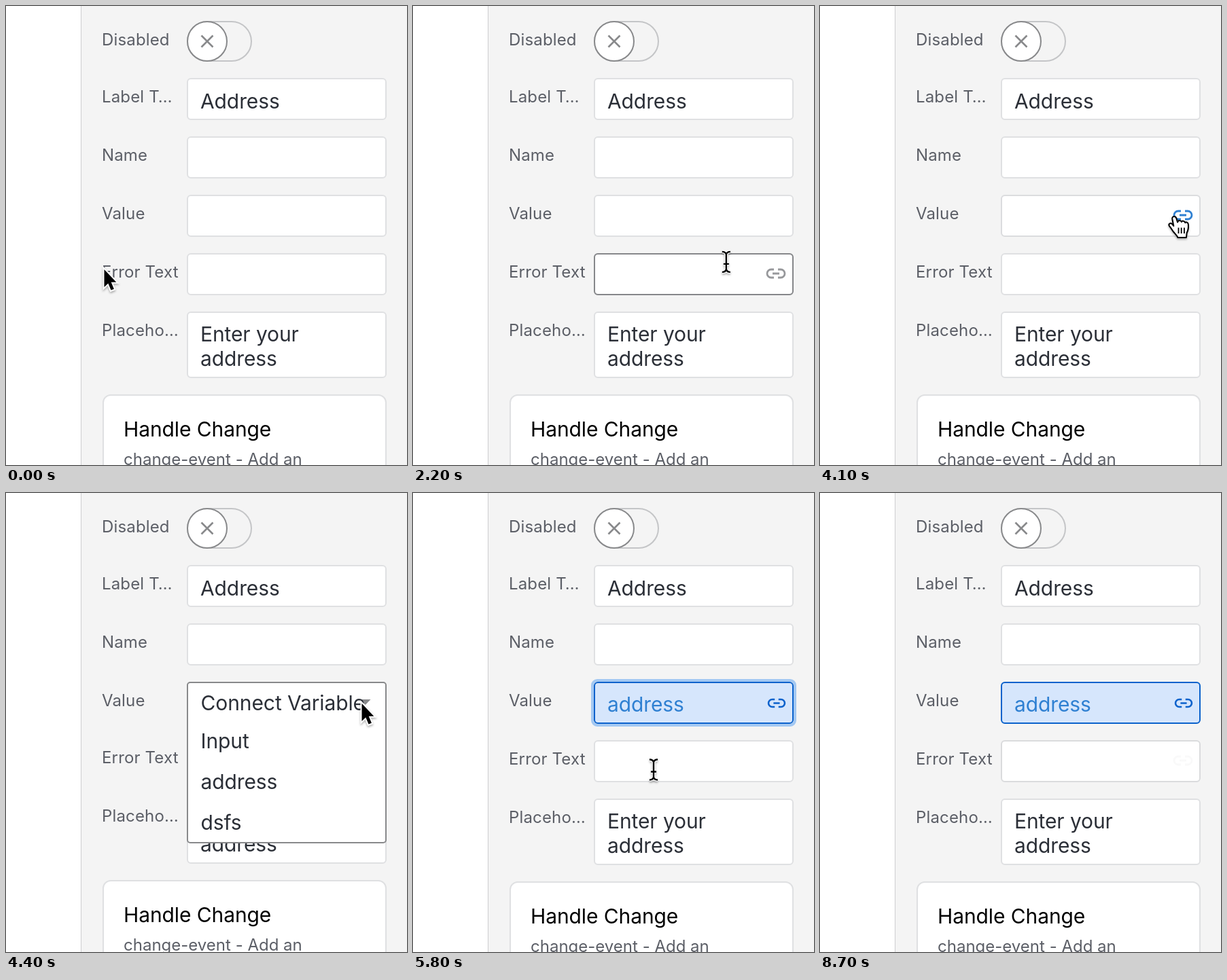
An HTML page that plays this animation: 590 by 676 pixels, repeating every 9.2 s.

```html
<!DOCTYPE html>
<html lang="en">
<head>
<meta charset="utf-8">
<title>Connect a variable</title>
<style>
  html, body { margin: 0; width: 100%; height: 100%; overflow: hidden; background: #fff; }
  svg { display: block; width: 590px; height: 676px; }
  text { font-family: Inter, "Open Sans", sans-serif; font-size: 30px; fill: #2b2f37; letter-spacing: -.1px; }
  .label, .sub { font-size: 24px; fill: #5b5e66; letter-spacing: .15px; }
  .sub { letter-spacing: 0; }
  .title { fill: #000; }
  .box { fill: #fff; stroke: #dfe0e2; stroke-width: 2; }
  .hover { fill: none; stroke: #86878a; stroke-width: 2; }
  .bound { fill: #d6e6fc; stroke: #0b62cc; stroke-width: 2; }
  .link { fill: none; stroke-width: 2.8; }
  .cursor { filter: drop-shadow(0 2px 1.5px rgba(0, 0, 0, .3)); }
</style>
</head>
<body>
<svg viewBox="0 0 590 676">
  <defs>
    <rect id="field" x="267" y="107" width="292" height="60" rx="5"/>
    <path id="link" d="M-3-6H-7A6 6 0 0 0-7 6H-3M3-6H7A6 6 0 0 1 7 6H3M-5 0H5"/>
    <path id="ibeam" d="M-6-15Q-1-15 0-11Q1-15 6-15M-6 15Q-1 15 0 11Q1 15 6 15M0-11V11M-4 3H4"/>
  </defs>

  <rect x="110" width="480" height="676" fill="#f4f4f4"/>
  <rect x="110" width="1" height="676" fill="#cdcdcf"/>

  <text class="label" x="141" y="58">Disabled</text>
  <rect x="267" y="23" width="94" height="58" rx="29" fill="#f4f4f4" stroke="#c4c5c7" stroke-width="2"/>
  <circle cx="296" cy="52" r="29" fill="#fff" stroke="#88898b" stroke-width="2"/>
  <path d="M287.5 43.5l17 17m0-17l-17 17" stroke="#88898b" stroke-width="2.6"/>

  <text class="label" x="141" y="142">Label T…</text>
  <use class="box" href="#field"/>
  <text x="286" y="150.5">Address</text>

  <text class="label" x="141" y="228">Name</text>
  <use class="box" href="#field" y="86"/>

  <text class="label" x="141" y="314">Value</text>
  <use class="box" href="#field" y="172"/>
  <use class="hover" id="valueHover" href="#field" y="172"/>
  <use class="link" id="valueLink" href="#link" x="534" y="308" stroke="#2f80d2"/>

  <g id="lower">
    <text class="label" x="141" y="400">Error Text</text>
    <use class="box" href="#field" y="258"/>
    <g id="errorHover">
      <use class="hover" href="#field" y="258"/>
      <use class="link" href="#link" x="534" y="394" stroke="#97989b"/>
    </g>
    <text class="label" x="141" y="486">Placeho…</text>
    <rect class="box" x="267" y="451" width="292" height="96" rx="5"/>
    <text x="286" y="494">Enter your</text>
    <text x="286" y="530">address</text>
    <rect class="box" x="143" y="573" width="416" height="160" rx="11"/>
    <text class="title" x="173" y="634">Handle Change</text>
    <text class="sub" x="173" y="676">change-event - Add an</text>
  </g>

  <g id="menu">
    <rect x="267" y="279" width="292" height="236" rx="4" fill="#fff" stroke="#88898b" stroke-width="2"/>
    <path d="M521 304h15.5l-7.7 8z" fill="#88898b"/>
    <text x="286.5" y="320">Connect Variable</text>
    <text x="286.5" y="376">Input</text>
    <text x="286.5" y="436">address</text>
    <text x="286.5" y="496">dsfs</text>
  </g>

  <g id="bound">
    <rect id="ring" x="264" y="276" width="298" height="66" rx="7" fill="none" stroke="#8fbdf2" stroke-width="4"/>
    <use class="bound" href="#field" y="172"/>
    <text x="286" y="322" style="fill:#2f80d2">address</text>
    <use class="link" href="#link" transform="translate(535 309.5) scale(.92)" stroke="#0b62cc"/>
  </g>

  <g class="cursor" id="arrow">
    <path d="M1 1V27L6.8 21.4 11 31.6 15.4 29.8 11.2 19.8H18.8Z" stroke="#fff" stroke-width="4" paint-order="stroke"/>
  </g>
  <g class="cursor" id="hand">
    <path d="M-2.2 15L-4.2 4.5C-4.8.2.6-.4 1.8 3.6L3.6 9.5C4 6.6 8.4 6 9.4 9 10 7 14 7 14.8 10.2 16 8.6 19.2 9.4 19.4 13 19.8 18 19.2 21.5 17.2 25L16.4 32H4C2.5 28.5 0 26.5-2.5 23.5-4.8 20.5-6 17.5-8.4 15.2-10.6 12-7 9.8-4.6 12Z"
      fill="#fff" stroke="#000" stroke-width="2" stroke-linejoin="round"/>
    <path d="M5 17.5V26M9.2 17.5V26M13.4 17.5V26" stroke="#000" stroke-width="1.8"/>
  </g>
  <g class="cursor" id="beam" fill="none">
    <use href="#ibeam" stroke="#fff" stroke-width="5"/>
    <use href="#ibeam" stroke="#000" stroke-width="2.4"/>
  </g>
</svg>
<script>
  const LOOP = 9200, TICK = 100;
  const OPEN = 4300, PICK = 5800;
  const start = performance.now();
  const el = id => document.getElementById(id);
  const show = (id, on) => el(id).style.visibility = on ? 'visible' : 'hidden';
  const ramp = (t, a, b) => Math.min(1, Math.max(0, (t - a) / (b - a)));

  // Each move glides from the place reached so far; bend > 1 delays the vertical part
  const home = { x: 143.5, y: 387 }, away = { x: 800, y: 289 };
  const moves = [
    { from: 100, to: 400, x: 51, y: 457 },
    { from: 1500, to: 1600, x: 139.5, y: 417.5 },
    { from: 1600, to: 2400, x: 568, y: 289, bend: 4 },
    { from: 2400, to: 2500, ...away },
    { from: 3300, to: 3400, x: 528, y: 305 },
    { from: 3400, to: 4100, x: 522.5, y: 309 },
    { from: 4900, to: 5300, x: 354, y: 407.5 },
    { from: PICK, to: 6000, x: 353, y: 418 },
    { from: 8300, to: 8400, ...away }
  ];

  function pointer(t) {
    let { x, y } = home;
    for (const m of moves) {
      const p = ramp(t, m.from, m.to);
      x += (m.x - x) * p;
      y += (m.y - y) * p ** (m.bend || 1);
    }
    return { x, y };
  }

  function shapeAt({ x, y }, menuOpen) {
    const inField = top => x > 266 && x < 560 && y > top && y < top + 62;
    if (menuOpen) return 'arrow';
    if (inField(278)) return 'hand';
    return inField(364) ? 'beam' : 'arrow';
  }

  // Linear rise, then exponential decay
  const glow = (t, on, off) => ramp(t, on, on + 200) * Math.exp(-Math.max(0, t - off) / 100);

  function draw() {
    const t = Math.floor((performance.now() - start) % LOOP / TICK) * TICK;
    const menuOpen = t >= OPEN && t < PICK;

    el('valueHover').style.opacity = glow(t, 3400, 3800);
    el('valueLink').style.opacity = ramp(t, 3400, 3600);
    el('errorHover').style.opacity = glow(t, 1700, 2200) + glow(t, PICK, 8400);
    el('ring').style.opacity = .8 * (1 - ramp(t, PICK, 6200));
    show('menu', menuOpen);
    show('bound', t >= PICK);
    el('lower').setAttribute('transform', `translate(0 ${menuOpen ? -2 : 0})`);

    const pos = pointer(t), shape = shapeAt(pos, menuOpen);
    for (const id of ['arrow', 'hand', 'beam']) show(id, id === shape);
    el(shape).setAttribute('transform', `translate(${pos.x} ${pos.y})`);
    requestAnimationFrame(draw);
  }
  draw();
</script>
</body>
</html>
```
